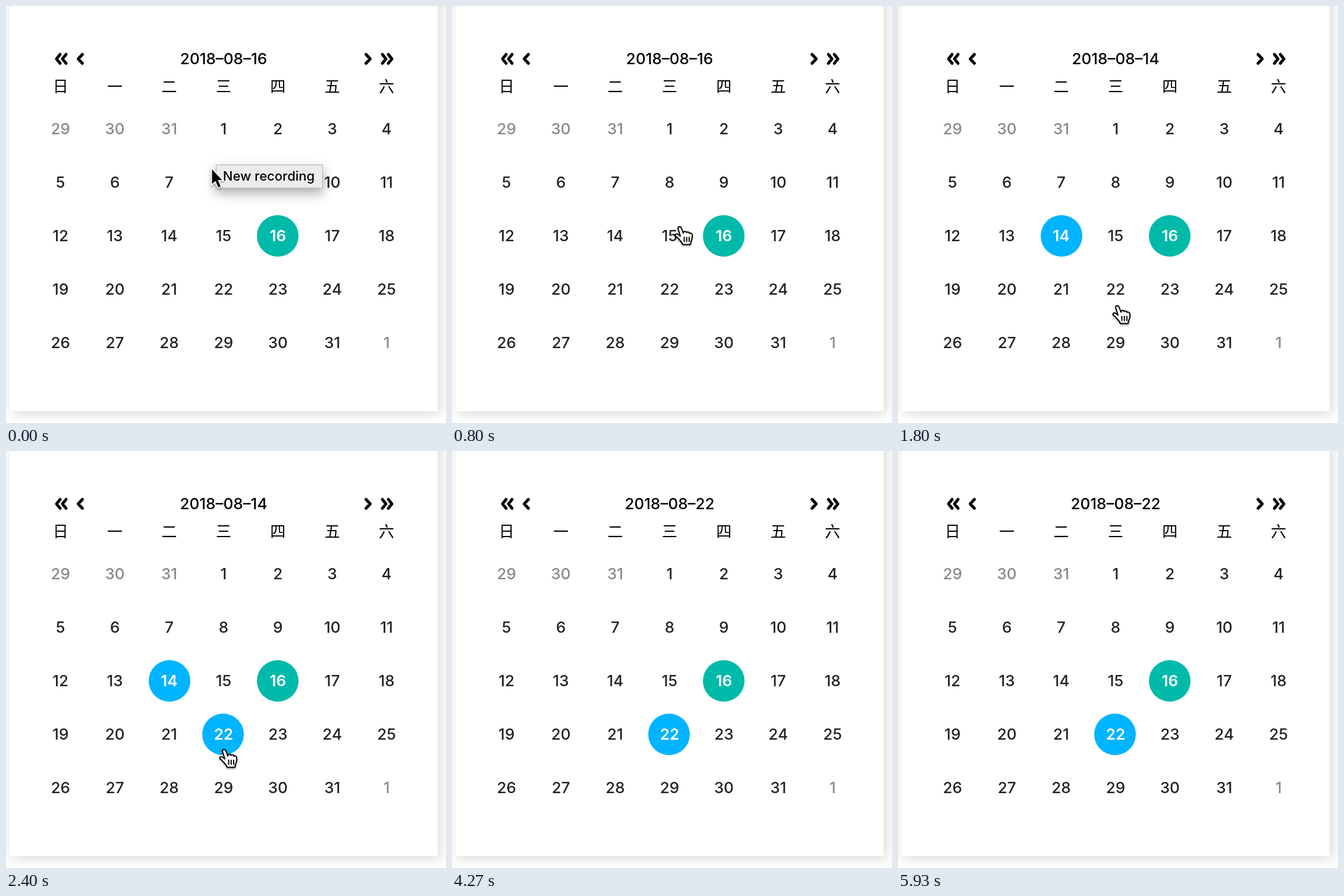
These frames come from a looping animation (740 by 702 pixels, 5.99 s). An HTML page:

```html
<!DOCTYPE html>
<html lang="zh">
<head>
<meta charset="utf-8">
<title>Calendar</title>
<style>
  html, body { margin: 0; width: 100%; height: 100%; overflow: hidden; background: #fff; }
  .card {
    position: absolute; left: 6px; top: -40px; width: 720px; height: 722px;
    background: #fff; box-shadow: 4px 4px 20px rgba(0, 0, 0, .16);
  }
  svg { position: absolute; left: 0; top: 0; display: block; }
  text { font: 450 26px Inter, Roboto, sans-serif; text-anchor: middle; fill: #222; }
  .title, .week text { fill: #000; }
  .week text { font-family: "Noto Sans CJK SC", "Noto Sans CJK JP", "Noto Sans CJK", sans-serif; font-weight: 400; }
  .other text { fill: #8a8a8a; }
  .day circle { fill: none; }
  .today circle { fill: #00baa9; }
  .picked circle { fill: #00b4ff; }
  .today text, .picked text { fill: #fff; font-weight: 600; }
  .nav { fill: none; stroke: #000; stroke-width: 5; stroke-linecap: round; stroke-linejoin: round; }
  .tip rect { fill: #ececec; stroke: #b4b4b4; filter: drop-shadow(0 8px 10px rgba(0, 0, 0, .34)); }
  .tip text { font-size: 22px; fill: #000; }
  .cursor { filter: drop-shadow(0 2px 1.5px rgba(0, 0, 0, .35)); }
  .arrow { fill: #000; stroke: #fff; stroke-width: 4; paint-order: stroke; stroke-linejoin: miter; }
  .hand path { fill: #fff; stroke: #000; stroke-width: 2; stroke-linejoin: round; stroke-linecap: round; }
</style>
</head>
<body>
<div class="card"></div>
<svg width="740" height="702" viewBox="0 0 740 702">
  <defs>
    <path id="chevrons" d="M91 81.5 85 89 91 96.5M101 81.5 95 89 101 96.5M128.5 81.5 121.5 89 128.5 96.5"/>
  </defs>
  <g class="nav">
    <use href="#chevrons"/>
    <use href="#chevrons" transform="matrix(-1 0 0 1 734 0)"/>
  </g>
  <text class="title" id="title" x="366" y="98"></text>
  <g class="week" id="week"></g>
  <g id="days"></g>
  <g class="tip" id="tip">
    <rect x="353.5" y="267.5" width="179" height="39"/>
    <text x="442" y="294">New recording</text>
  </g>
  <g class="cursor" id="cursor">
    <path class="arrow" id="arrow" d="M1.5 3V27.5L7.2 22.4 12 33.4 16 31.7 11.3 20.9H18.5Z"/>
    <g class="hand" id="hand" transform="translate(-1 -1.5)">
      <path d="M-2 3C-1.8-1 3-1 4 3L7 11C7 7 12 7.5 12.5 10 13 8.5 17 8.5 17.5 11.5 18.5 10 22 11 22 14 22.5 18 22 21 20 25L19 30H6C5 26 0 22-3 18-10 14-5 10.5-1 13.5L2 16Z"/>
      <path d="M8.5 18V25M12.7 18V25M16.9 18V25"/>
    </g>
  </g>
</svg>
<script>
const LOOP = 5990, STEP = 66.6, RADIUS = 35;
const byId = id => document.getElementById(id);
const [title, tip, cursor, arrow, hand] = ["title", "tip", "cursor", "arrow", "hand"].map(byId);
const colX = col => 91.7 + 91.4 * col;
const rowY = row => 207 + 90 * row;
// Discs sit on a two-pixel grid.
const discX = x => RADIUS + 2 * Math.round((x - RADIUS) / 2);

function add(parent, tag, attrs, label) {
  const node = document.createElementNS("http://www.w3.org/2000/svg", tag);
  for (const key in attrs) node.setAttribute(key, attrs[key]);
  if (label !== undefined) node.textContent = label;
  return parent.appendChild(node);
}

[..."日一二三四五六"].forEach((name, col) =>
  add(byId("week"), "text", { x: colX(col), y: 144.5 }, name));

// The grid starts on 29 July 2018 and covers five weeks.
const cells = Array.from({ length: 35 }, (_, i) => {
  const x = colX(i % 7), y = rowY(Math.floor(i / 7));
  const day = new Date(2018, 6, 29 + i);
  const number = day.getDate(), inMonth = day.getMonth() === 7;
  const node = add(byId("days"), "g", { class: "day" });
  node.classList.toggle("other", !inMonth);
  node.classList.toggle("today", inMonth && number === 16);
  add(node, "circle", { cx: discX(x), cy: y, r: RADIUS });
  add(node, "text", { x, y: y + 9.4 }, number);
  return { node, x, y, number, inMonth };
});

// Pointer stops: time, x, y
const path = [
  [0, 345, 272], [130, 345, 272], [600, 385, 358], [800, 383, 373],
  [1130, 283, 393], [1250, 283, 393], [1400, 353, 421], [1800, 369, 506],
  [2400, 367, 504], [3000, 366, 504], [3530, 363, 504], [3690, 363, 504],
  [4190, 674, 0]
];

function pointerAt(t) {
  const next = path.findIndex(stop => stop[0] > t);
  if (next < 0) return null;
  const [t0, x0, y0] = path[next - 1], [t1, x1, y1] = path[next];
  const u = (t - t0) / (t1 - t0), ease = u * u * (3 - 2 * u);
  return { x: x0 + (x1 - x0) * ease, y: y0 + (y1 - y0) * ease };
}

const show = (node, on) => node.style.display = on ? "" : "none";

function draw(t) {
  const chosen = t < 1260 ? 16 : t < 2460 ? 14 : 22;
  const pressed = t >= 1190 && t < 1260 ? 14 : t >= 2390 && t < 2460 ? 22 : 0;
  title.textContent = "2018–08–" + chosen;
  for (const { node, number, inMonth } of cells) {
    const on = inMonth && number !== 16 && (number === chosen || number === pressed);
    node.classList.toggle("picked", on);
  }

  const fade = Math.min(1, Math.max(0, (330 - t) / 200));
  tip.style.opacity = fade;
  show(tip, fade > 0);

  const p = pointerAt(t);
  show(cursor, p);
  if (!p) return;
  const overDay = t > 130 && cells.some(c => Math.hypot(c.x - p.x, c.y - p.y) < RADIUS);
  cursor.setAttribute("transform", `translate(${p.x} ${p.y})`);
  show(hand, overDay);
  show(arrow, !overDay);
}

const start = performance.now();
function tick() {
  const t = (performance.now() - start) % LOOP;
  draw(Math.floor(t / STEP) * STEP);
  requestAnimationFrame(tick);
}
tick();
</script>
</body>
</html>
```
